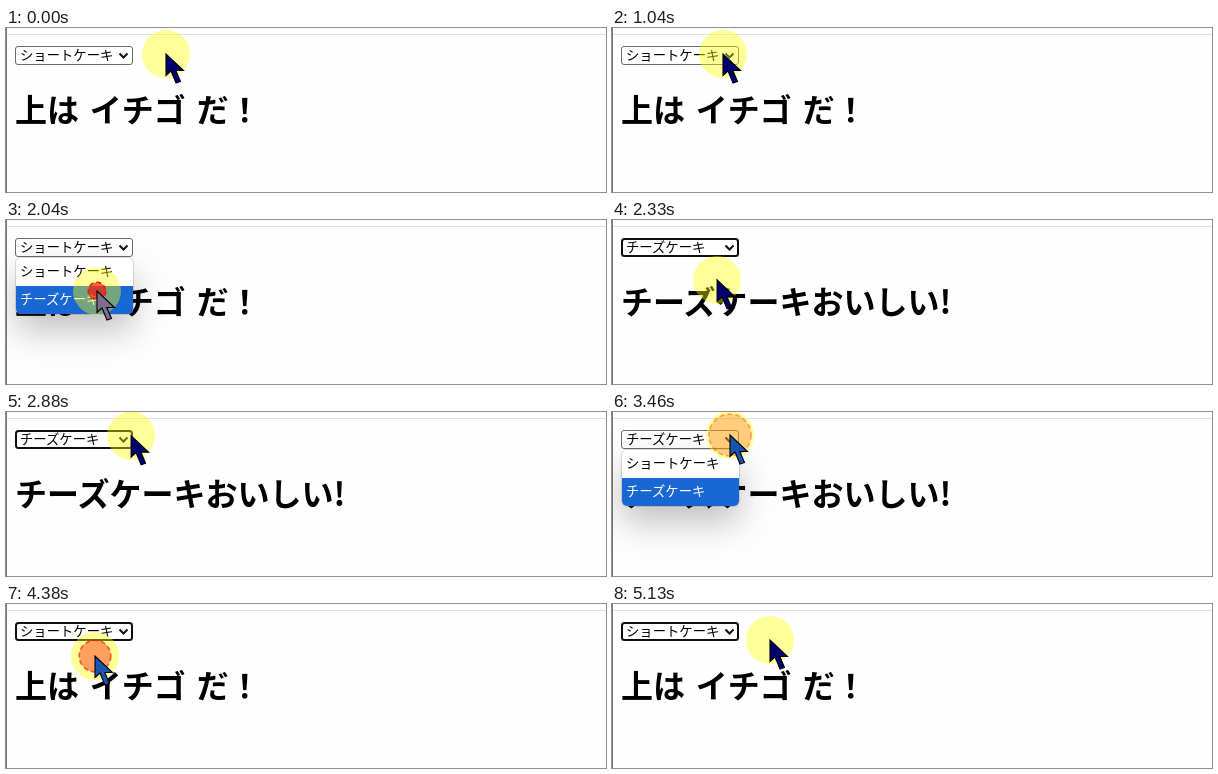
These frames come from a looping animation (600 px wide and 164 px high, 5.93 s). An HTML page:

```html
<!DOCTYPE html>
<html lang="ja">
<head>
<meta charset="utf-8">
<style>
  html, body { margin: 0; width: 100%; height: 100%; overflow: hidden; background: #fefefe; }
  svg { display: block; width: 600px; height: 164px; font: 13.333px "Noto Sans CJK JP", "Noto Sans CJK", sans-serif; }
  #heading { font-size: 32px; font-weight: 700; word-spacing: 3.6px; }
  #panel { filter: drop-shadow(0 16px 17px rgba(0, 0, 0, .25)); }
  #box { fill: #fff; stroke: #6b6b6b; }
  #box.focused { stroke: #101010; stroke-width: 2; }
</style>
</head>
<body>
<svg viewBox="0 0 600 164">
  <defs>
    <clipPath id="rounded"><rect x="10" y="38" width="117" height="56" rx="5"/></clipPath>
  </defs>
  <rect width="600" height="164" fill="#fefefe"/>
  <path d="M1 6.5H600" stroke="#e2dfe4"/>
  <path d="M.5 0V164" stroke="#777"/>
  <text id="heading" x="9" y="94"></text>

  <rect id="box" rx="2.5"/>
  <text id="value" x="14" y="32"></text>
  <path d="M113.5 25.5l4 4 4-4" fill="none" stroke="#111" stroke-width="2"/>

  <g id="popup">
    <rect id="panel" x="10" y="38" width="117" height="56" rx="5" fill="#fff"/>
    <g clip-path="url(#rounded)"><rect id="bar" x="10" width="117" height="28" fill="#1967d2"/></g>
    <rect x="9.5" y="37.5" width="118" height="57" rx="5.5" fill="none" stroke="#000" stroke-opacity=".12"/>
    <text class="item" x="14" y="56">ショートケーキ</text>
    <text class="item" x="14" y="84">チーズケーキ</text>
  </g>

  <g id="cursor">
    <circle r="24" fill="#ff0" fill-opacity=".4"/>
    <circle id="ripple" fill="#f00" stroke="#f01e00" stroke-width="1.6" stroke-dasharray="5 3"/>
    <path id="arrow" d="M0 0V21.5L5 17 10 29 14.500 27.500 9.800 16.500H17.500Z" stroke="#000" stroke-width="1.1"/>
  </g>
</svg>
<script>
const LOOP = 5930;
const CLICK = 320;
const OPEN_DELAY = 75;
const CHOOSE_DELAY = 170;
const LIST_TOP = 38;
const ROW = 28;

const cakes = ["ショートケーキ", "チーズケーキ"];
const headings = ["上は イチゴ だ！", "チーズケーキおいしい!"];

// Odd clicks open the list, even clicks choose the hovered cake.
const clicks = [1080, 1925, 3180, 4170];

const home = { x: 160, y: 26 };
const moves = [
  { from: 40, to: 420, x: 111, y: 26 },
  { from: 1400, to: 1930, x: 91, y: 71 },
  { from: 2250, to: 2500, x: 148, y: 26 },
  { from: 2710, to: 2960, x: 118, y: 23 },
  { from: 3520, to: 3920, x: 89, y: 52 },
  { from: 4490, to: 4710, x: 158, y: 36 }
];

const $ = id => document.getElementById(id);
const items = document.querySelectorAll(".item");
const clamp = v => Math.max(0, Math.min(1, v));
const ease = k => k * k * (3 - 2 * k);

function setAttrs(node, attrs) {
  for (const name in attrs) node.setAttribute(name, attrs[name]);
}

function cursorAt(t) {
  return moves.reduce((pos, move) => {
    const k = ease(clamp((t - move.from) / (move.to - move.from)));
    return { x: pos.x + (move.x - pos.x) * k, y: pos.y + (move.y - pos.y) * k };
  }, home);
}

function drawPage(t, y) {
  const done = clicks.filter((c, i) => t >= c + (i % 2 ? CHOOSE_DELAY : OPEN_DELAY)).length;
  const open = done % 2 === 1;
  const cake = Math.floor(done / 2) % 2;
  const hovered = y < LIST_TOP ? cake : Math.floor((y - LIST_TOP) / ROW);
  const focused = !open && done > 0;
  const inset = focused ? .5 : 0;

  $("heading").textContent = headings[cake];
  $("value").textContent = cakes[cake];
  $("box").classList.toggle("focused", focused);
  setAttrs($("box"), { x: 9.5 + inset, y: 18.5 + inset, width: 117 - 2 * inset, height: 18 - 2 * inset });
  $("popup").style.display = open ? "" : "none";
  $("bar").setAttribute("y", LIST_TOP + ROW * hovered);
  items.forEach((node, i) => node.setAttribute("fill", i === hovered ? "#fff" : "#000"));
}

function drawCursor(t, { x, y }) {
  const start = clicks.findLast(c => c <= t) ?? -LOOP;
  const p = (t - start) / CLICK;
  const alpha = clamp(.9 - .8 * p);
  setAttrs($("cursor"), { transform: `translate(${x} ${y})` });
  setAttrs($("ripple"), {
    r: 24 * clamp(p),
    "fill-opacity": alpha,
    "stroke-opacity": clamp(alpha * 1.8),
    visibility: p < 1 ? "visible" : "hidden"
  });

  // A press flashes the navy arrow mauve, then blue.
  const blue = clamp((1.2 - p) * 5);
  const mauve = clamp(1 - Math.abs(p - .33) / .3);
  const red = 24 * blue + 115 * mauve;
  const green = 84 * blue + 28 * mauve;
  $("arrow").setAttribute("fill", `rgb(${red}, ${green}, ${110 + 65 * blue - 35 * mauve})`);
}

const origin = performance.now();
function frame() {
  const t = (performance.now() - origin) % LOOP;
  const pos = cursorAt(t);
  drawPage(t, pos.y);
  drawCursor(t, pos);
  requestAnimationFrame(frame);
}
frame();
</script>
</body>
</html>
```
